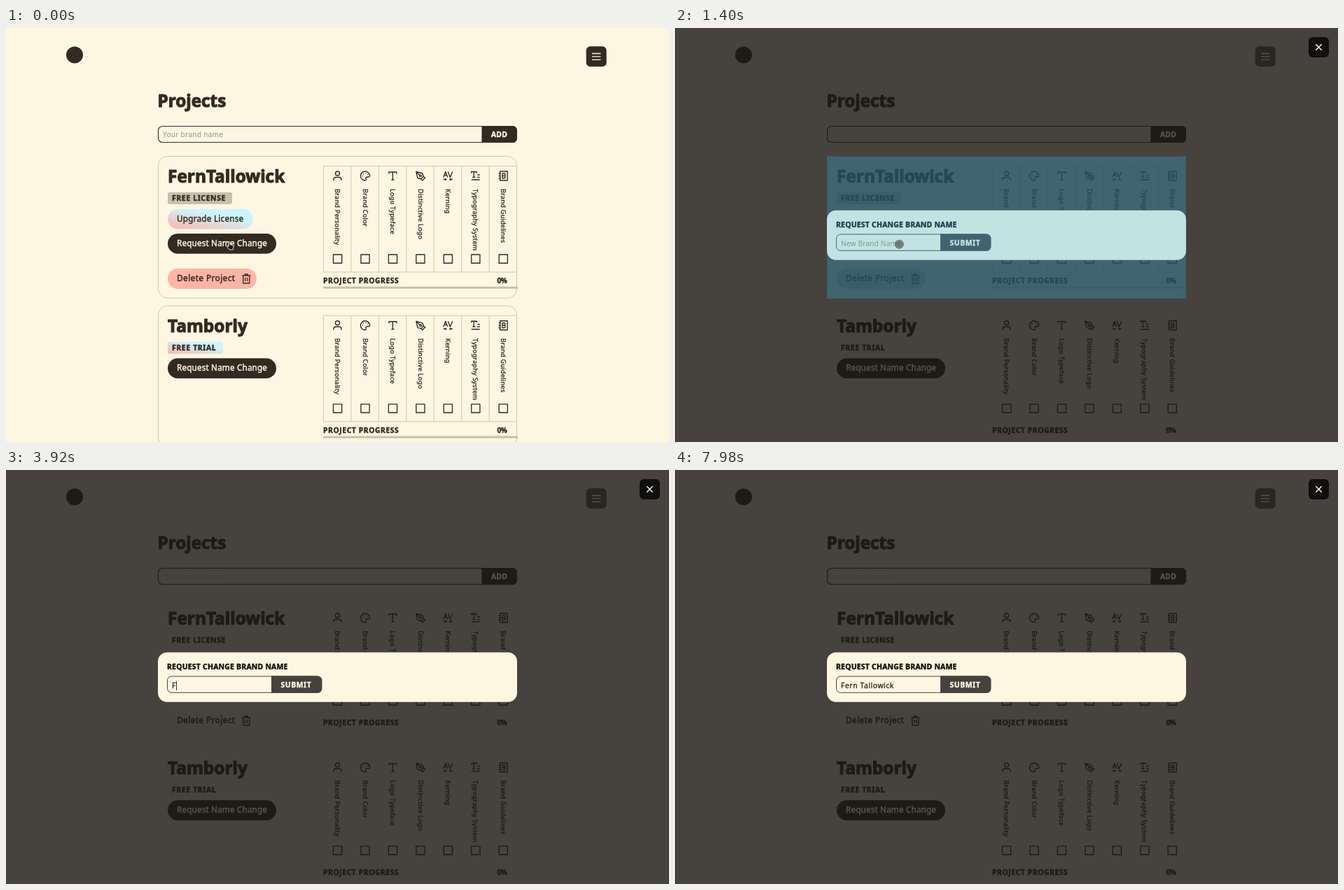
These frames come from a looping animation (947 px wide and 592 px high, 8000 ms). An HTML page:

```html
<!DOCTYPE html>
<html lang="en">
<head>
<meta charset="utf-8">
<title>Projects</title>
<style>
html, body { margin: 0; width: 100%; height: 100%; overflow: hidden; background: #fff6e2; }
svg {
  display: block; width: 100%; height: 100%;
  font-family: "Noto Sans", "Open Sans", sans-serif;
  --bg: #fff6e2; --ink: #352a22; --button: #352a22; --label: #fff6e2; --menu: #352a22;
  --line: #cfc7b3; --soft: #c9c0ac; --pink: #ffb4a6; --sky: #caf5ff; --hint: #9a9182;
}
svg.dim {
  --bg: #46423e; --ink: #1e1b17; --button: #1e1b17; --label: #57534a; --menu: #292621;
  --line: #46423e; --soft: #46423e; --pink: #46423e; --sky: #46423e; --hint: #46423e;
}
svg.tapped #card0 { --line: #3d3a36; --soft: #3d3a36; --pink: #3d3a36; }
.stroke { fill: none; stroke: var(--ink); stroke-width: 1.35; stroke-linejoin: round; }
.line { fill: none; stroke: var(--line); }
text { white-space: pre; fill: var(--color); stroke: var(--color); stroke-width: 0; stroke-linejoin: round; }
.medium { font-weight: 400; stroke-width: .035em; }
.heavy { font-weight: 800; stroke-width: .045em; }
</style>
</head>
<body>
<svg id="stage" viewBox="0 0 947 592"></svg>
<script>
const stage = document.getElementById('stage');

const rect = (x, y, w, h, r, fill) =>
  `<rect x="${x}" y="${y}" width="${w}" height="${h}" rx="${r}" fill="${fill}"/>`;
const text = (x, y, str, size, weight, spacing = 0, color = 'var(--ink)', extra = '') =>
  `<text class="${weight}" x="${x}" y="${y}" font-size="${size}" letter-spacing="${spacing}" style="--color:${color}" ${extra}>${str}</text>`;
const caps = (x, y, str, spacing, color) => text(x, y, str, 10.4, 'heavy', spacing, color);
const icon = (x, y, d) => `<path class="stroke" transform="translate(${x} ${y})" d="${d}"/>`;

const steps = [
  ['Brand Personality', 'M-3-3.5a3 3 0 1 0 6 0a3 3 0 1 0-6 0M-5.5 6.5v-1.5a3 3 0 0 1 3-3h5a3 3 0 0 1 3 3v1.5'],
  ['Brand Color', 'M0-6.5a6.5 6.5 0 1 0 0 13c2 0 1.5-2 1-3s1-2 2.5-2h1.5c1.5 0 2-1.5 1.5-3C6-4 3-6.5 0-6.5zM-4 0h1M-3-3h1M.5-4h1M3.5-2h1'],
  ['Logo Typeface', 'M-5.5-3v-2.5h11v2.5M0-5.5v11M-2 5.5h4'],
  ['Distinctive Logo', 'M-6-6L3-3.5L4.5 1L1 4.5L-4 3ZM1 4.5l2 2l4-4l-2.5-1.5M-6-6l5 5M-1 0a1.3 1.3 0 1 0 2.6 0a1.3 1.3 0 1 0-2.6 0'],
  ['Kerning', 'M-6.5 2l3-8l3 8M-5.5-1h4M0-6l3 8l3.5-8M-6.5 5h4.5M-3.5 3.5v3M6.5 5h-4.5M3.5 3.5v3'],
  ['Typography System', 'M-6-4v-2h7.5v2M-2.5-6v8M-4.5 2h4M-6 5.5h12M2.5 2h3.5M2.5-1.5h3.5'],
  ['Brand Guidelines', 'M-4.5-6.5h10.5v13h-10.5zM-6.5-3.5h3M-6.5 0h3M-6.5 3.5h3M-1.2-3.5h2.4a1.7 1.7 0 0 1 0 3.5h-2.4zM-1.2 0h2.7a1.8 1.8 0 0 1 0 3.5h-2.7z'],
];

function checklist() {
  const columns = steps.map(([label, shape], i) => {
    const left = 453.5 + i * 39.45, mid = left + 20;
    return `<path class="line" d="M${left} 197.5V349"/>` + icon(mid, 211.5, shape) +
      text(0, 0, label, 9.1, 'medium', .27, 'var(--ink)', `transform="translate(${mid - 3.3} 230) rotate(90)"`) +
      `<rect class="stroke" x="${mid - 6}" y="324" width="12.2" height="12.2"/>`;
  }).join('');
  return columns + '<path class="line" d="M453 197.5H730M453 349H730"/>' +
    caps(453, 365, 'PROJECT PROGRESS', .55) + text(701.5, 365, '0%', 10, 'heavy', -.4) +
    '<path d="M454.5 371.3H730" stroke="var(--soft)" stroke-width="3" stroke-linecap="round"/>';
}

const renameButton = y => rect(231, y, 155, 28.7, 14.3, 'var(--button)') +
  text(244, y + 18, 'Request Name Change', 11.7, 'medium', .17, 'var(--label)');

function card(index, name, tag, tagWidth, tagFill, buttons) {
  return `<g id="card${index}" transform="translate(0 ${index * 213.8})">
    <rect class="line" x="217.5" y="183.5" width="512" height="202.7" rx="13"/>
    ${text(231, 221, name, 24.4, 'heavy')}
    ${rect(231, 235, tagWidth, 17, 3, tagFill)}${caps(237, 247, tag, .65)}
    ${buttons}${checklist()}</g>`;
}

const trash = 'M-6-4.5h12M-4.5-4.5v11h9v-11M-2-4.5v-2h4v2M-1.5-1.5v5M1.5-1.5v5';
const firstButtons = rect(231, 259, 122, 28.5, 14.2, 'url(#blend)') +
  text(244, 276.5, 'Upgrade License', 11.7, 'medium', .25) + renameButton(294) +
  rect(231, 344, 127, 29, 14.5, 'var(--pink)') +
  text(244, 362, 'Delete Project', 12, 'medium', .33) + icon(343.3, 358.5, trash);

const pageMarkup = `
  <defs><linearGradient id="blend" x1="0" y1="1" x2=".6" y2=".3">
    <stop stop-color="var(--pink)"/><stop offset="1" stop-color="var(--sky)"/>
  </linearGradient></defs>
  ${rect(0, 0, 947, 592, 0, 'var(--bg)')}
  <circle cx="98" cy="38.5" r="12" fill="var(--ink)"/>
  ${rect(828.7, 26.3, 29, 29, 6, 'var(--menu)')}
  <path d="M837 36.5h12.5M837 40.9h12.5M837 45.3h12.5" stroke="var(--label)" stroke-width="1.3"/>
  ${text(216.5, 113, 'Projects', 24.3, 'heavy')}
  <rect class="stroke" style="stroke-width:1.15" x="217.5" y="140.5" width="512" height="23" rx="6"/>
  <path d="M679.5 140H723.5a6.5 6.5 0 0 1 6.5 6.5v11a6.5 6.5 0 0 1-6.5 6.5H679.5z" fill="var(--button)"/>
  ${text(224, 156, 'Your brand name', 10.3, 'regular', .15, 'var(--hint)')}
  ${caps(693, 156, 'ADD', .2, 'var(--label)')}
  ${card(0, 'FernTallowick', 'FREE LICENSE', 92, 'var(--soft)', firstButtons)}
  ${card(1, 'Tamborly', 'FREE TRIAL', 79, 'url(#blend)', renameButton(258.5))}`;

const modalMarkup = `<g id="modal">
  ${rect(217, 260.7, 513, 71, 13, '#fff6e2')}
  ${caps(230, 285, 'REQUEST CHANGE BRAND NAME', .25, '#15120f')}
  <rect x="230.5" y="295" width="220" height="23.3" rx="6" fill="none" stroke="#46423e"/>
  <path d="M379 294.5H445a6.5 6.5 0 0 1 6.5 6.5v11.3a6.5 6.5 0 0 1-6.5 6.5H379z" fill="#46423e"/>
  ${caps(392.5, 310.7, 'SUBMIT', .55, '#fff6e2')}
  ${text(237, 311.8, 'New Brand Name', 10.3, 'regular', .05, '#9a9182', 'id="hint"')}
  ${text(237, 311.8, '', 10.4, 'medium', .55, '#352a22', 'id="typed"')}
  <path id="caret" d="M.5 302V315" stroke="#352a22"/>
  ${rect(905, 13, 29, 29, 6, '#100f0e')}
  <path d="M915.3 23.3l8.4 8.4m0-8.4l-8.4 8.4" stroke="#fff" stroke-width="1.4"/>
  <rect id="tap" x="217" y="183.5" width="513" height="203.3" fill="#33b5e5"/>
</g>`;

const pointerMarkup = `
  <path id="hand" d="M-2-5q1.3-1 2 .4v3.4l4 1q1.5.5 1 2.2l-1 4h-5l-3-4q-.6-1.6 1-1.4l1 .8z"
    fill="#15120f" stroke="#fff" stroke-width=".9"/>
  <circle id="touch" cx="320.3" cy="309.2" r="6.3"/>`;

stage.innerHTML = pageMarkup + modalMarkup + pointerMarkup;
const [modal, hint, typed, caret, tap, hand, touch] =
  ['modal', 'hint', 'typed', 'caret', 'tap', 'hand', 'touch'].map(id => document.getElementById(id));

const LOOP = 8000, TOUCH_AT = 910, OPEN_AT = 1330, FOCUS_AT = 2030, TOUCH_END = 2870;
const NAME = 'Fern Tallowick';
const keyTimes = [3640, 4200, 4480, 4760, 5040, 5320, 5600, 6020, 6300, 6930, 7070, 7210, 7350, 7420];
const handPath = [[0, 320, 311], [250, 290, 277], [560, 331, 450], [840, 320, 310]];

const show = (node, visible) => node.style.display = visible ? '' : 'none';

function handAt(t) {
  const next = handPath.findIndex(p => p[0] > t);
  if (next < 0) return handPath[handPath.length - 1].slice(1);
  const a = handPath[next - 1], b = handPath[next];
  const u = (t - a[0]) / (b[0] - a[0]), ease = u * u * (3 - 2 * u);
  return [a[1] + (b[1] - a[1]) * ease, a[2] + (b[2] - a[2]) * ease];
}

function draw(t) {
  const open = t >= OPEN_AT;
  const tint = open ? Math.max(0, 1 - (t - OPEN_AT) / 280) : 0;
  stage.classList.toggle('dim', open);
  stage.classList.toggle('tapped', tint > 0);
  show(modal, open);
  tap.setAttribute('opacity', .4 * tint);

  show(hand, t < TOUCH_AT);
  hand.setAttribute('transform', `translate(${handAt(t)})`);
  show(touch, t >= TOUCH_AT && t < TOUCH_END);
  touch.setAttribute('fill', open ? 'rgba(75,72,70,.62)' : 'rgba(75,70,65,.6)');
  touch.setAttribute('stroke', open ? 'rgba(110,105,100,.4)' : 'rgba(205,200,190,.6)');
  touch.setAttribute('r', t >= 1820 && t < 1890 ? 5.6 : 6.3);

  const count = keyTimes.filter(k => k <= t).length;
  typed.textContent = NAME.slice(0, count);
  show(hint, !count);
  const sinceKey = t - (count ? keyTimes[count - 1] : FOCUS_AT + 70);
  show(caret, sinceKey >= 0 && sinceKey % 1000 < 500);
  const width = open && count ? typed.getComputedTextLength() : 0;
  caret.setAttribute('transform', `translate(${Math.round(237 + width)} 0)`);
}

const start = performance.now();
function tick() {
  draw((performance.now() - start) % LOOP);
  requestAnimationFrame(tick);
}
tick();
</script>
</body>
</html>
```
